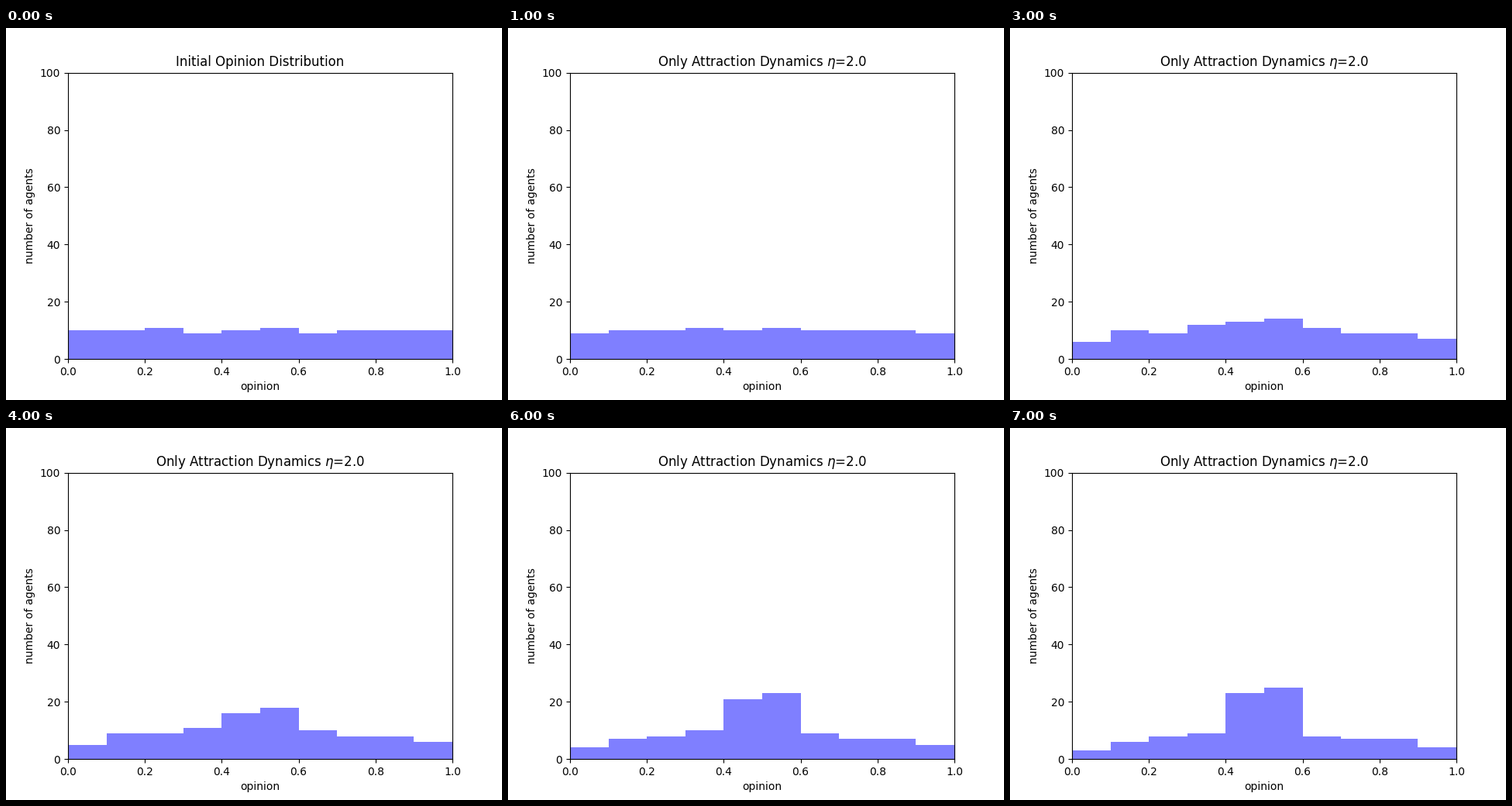
A matplotlib script that plays this animation: 640 px wide and 480 px high, repeating every 8000 ms.

```python
import matplotlib.pyplot as plt
import numpy as np
from matplotlib.animation import FuncAnimation

STEPS = 8
BINS = 10

# agents per opinion bin at a few key steps
KEYS = {
    0: [10, 10, 11, 9, 10, 11, 9, 10, 10, 10],
    1: [9, 10, 10, 11, 10, 11, 10, 10, 10, 9],
    3: [6, 10, 9, 12, 13, 14, 11, 9, 9, 7],
    7: [3, 6, 8, 9, 23, 25, 8, 7, 7, 4],
}


def ease(t):
    """Slight ease-out: attraction slows as opinions gather."""
    return t ** 0.8


def counts(step):
    """Whole agents per bin, eased between the neighbouring key steps."""
    start = max(k for k in KEYS if k <= step)
    end = min(k for k in KEYS if k >= step)
    t = ease((step - start) / max(end - start, 1))
    a, b = np.array(KEYS[start]), np.array(KEYS[end])
    return np.rint(a + (b - a) * t)


def heading(step):
    if step == 0:
        return "Initial Opinion Distribution"
    return r"Only Attraction Dynamics $\eta$=2.0"


fig, ax = plt.subplots(figsize=(6.4, 4.8), dpi=100)
bars = ax.bar(np.arange(BINS) / BINS, counts(0), width=1 / BINS,
              align="edge", color="blue", alpha=0.5)
ax.set_xlim(0, 1)
ax.set_ylim(0, 100)
ax.set_xlabel("opinion")
ax.set_ylabel("number of agents")
title = ax.set_title(heading(0))


def update(step):
    for bar, count in zip(bars, counts(step)):
        bar.set_height(count)
    title.set_text(heading(step))
    return [*bars, title]


anim = FuncAnimation(fig, update, frames=STEPS, interval=1000,
                     repeat=True, repeat_delay=0, blit=False)
plt.show()
```
